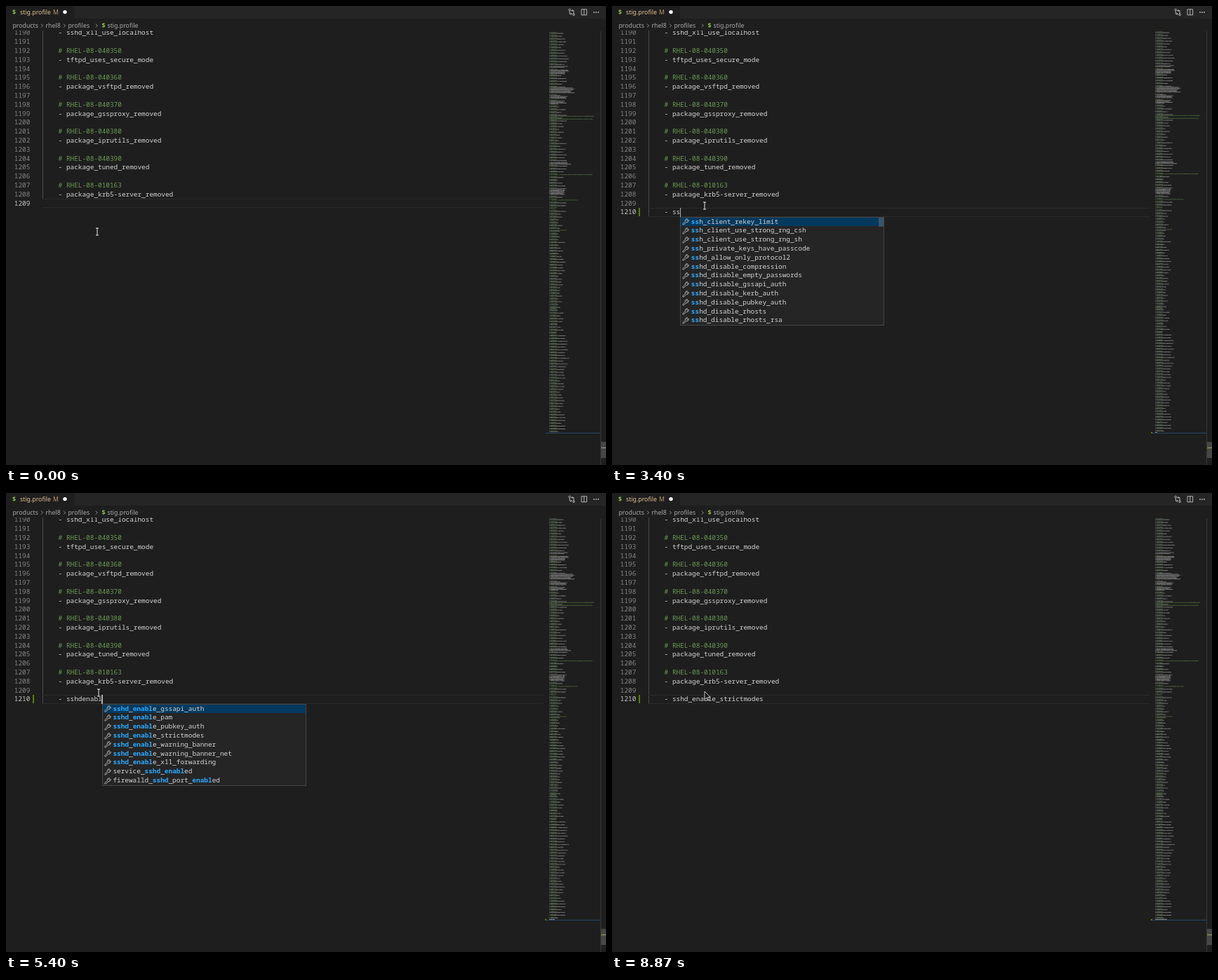
Write an HTML page with a canvas that moves like this. It is 855 px wide and 655 px high and loops after 8940 ms.

```html
<!DOCTYPE html>
<html lang="en">
<head>
<meta charset="utf-8">
<title>Profile editor</title>
<style>
html, body { margin: 0; width: 100%; height: 100%; overflow: hidden; background: #1e1e1e; }
#stage { position: absolute; left: 0; top: 0; width: 855px; height: 655px; overflow: hidden; background: #1e1e1e;
  font: 8.74px/12px "Noto Sans", sans-serif; color: #a9a9a9; }
#stage div, #stage svg, canvas, .ui { position: absolute; white-space: pre; }
#tabs { left: 0; top: 0; width: 855px; height: 18px; background: #252526; }
#tab { left: 0; top: 0; width: 97px; height: 18px; background: #1e1e1e; }
.shell { color: #8dc149; font-weight: bold; }
#code { left: 0; top: 35px; width: 766px; height: 620px; overflow: hidden; }
.mono, .row, .num { font: 9.41px/12.8px "Noto Sans Mono", monospace; color: #d4d4d4; }
.num { left: 0; width: 34.4px; text-align: right; color: #858585; }
.num.on { color: #c6c6c6; }
#stage .note { color: #6a9955; }
#guide { left: 52px; top: 0; width: 1px; background: #4a4a4a; }
#current { left: 52px; width: 714px; height: 12.8px; box-sizing: border-box; border: solid #2b2b2b; border-width: 1px 0; }
#caret { width: 1.4px; height: 12.8px; background: #aeafad; }
#added { left: 38px; top: 288px; width: 2px; height: 12px; background: #587c0c; }
#list { top: 300.5px; width: 289px; background: #252526; border: 1px solid #454545; }
.row { left: 0; width: 289px; height: 12.8px; }
.row.on { background: #04395e; }
.row span { position: absolute; left: 14.8px; }
.row b { color: #2aaaff; }
.row svg { left: 2px; top: 1.8px; }
#thumb { right: 0; top: 0; width: 7px; background: rgba(121, 121, 121, .45); }
</style>
</head>
<body>
<div id="stage">
  <div id="tabs"></div>
  <div id="tab"></div>
  <span class="ui shell" style="left:9px;top:2.5px">$</span>
  <span class="ui" style="left:20px;top:2.5px;color:#e2c08d">stig.profile</span>
  <span class="ui" style="left:67px;top:2.5px;color:#b39b75">M</span>
  <span class="ui" style="left:9.5px;top:22px">products</span>
  <span class="ui" style="left:56.5px;top:22px">rhel8</span>
  <span class="ui" style="left:88.5px;top:22px">profiles</span>
  <span class="ui shell" style="left:136.5px;top:22px">$</span>
  <span class="ui" style="left:144.5px;top:22px">stig.profile</span>
  <svg width="855" height="36" style="left:0;top:0" fill="none" stroke="#a9a9a9" stroke-width=".8">
    <circle cx="84" cy="8.6" r="2.7" fill="#fff" stroke="none"/>
    <path d="M50 25.5l2.5 2.5l-2.5 2.5M82 25.5l2.5 2.5l-2.5 2.5M127.8 25.5l2.5 2.5l-2.5 2.5"/>
    <g stroke="#c5c5c5" stroke-width=".9">
      <circle cx="803.2" cy="5.5" r="1.3"/><circle cx="809" cy="12.2" r="1.3"/>
      <path d="M803.2 6.8V11.2H806M804.8 9.7L806.3 11.2L804.8 12.7M809 10.9V6.5H806.2M807.4 5L805.9 6.5L807.4 8"/>
      <path d="M820 4.8h7.6v8h-7.6zM823.8 4.8v8"/>
    </g>
    <g fill="#c5c5c5" stroke="none"><circle cx="838" cy="8.9" r=".9"/><circle cx="841" cy="8.9" r=".9"/><circle cx="844" cy="8.9" r=".9"/></g>
  </svg>
  <div id="code"><div id="guide"></div></div>
  <div id="current"></div>
  <div id="added"></div>
  <div id="entry" class="mono" style="left:74.6px"></div>
  <div id="caret"></div>
  <div id="mini" style="left:768px;top:36px;width:79px;height:575px;overflow:hidden">
    <canvas id="map" width="79" height="575" style="left:0;top:0"></canvas>
    <div style="left:0;top:573px;width:79px;height:1px;background:#23486a"></div>
    <div id="miniMark" style="left:0;top:572px;width:2px;height:2px;background:#587c0c"></div>
    <div id="miniText" style="left:6.2px;top:572px;height:1px;background:#858585"></div>
  </div>
  <div style="left:847px;top:36px;width:1px;height:619px;background:#383838"></div>
  <div style="left:848px;top:622px;width:7px;height:23px;background:#464646"></div>
  <div style="left:848px;top:630px;width:7px;height:1px;background:#a0a0a0"></div>
  <div id="rulerMark" style="left:848px;top:629px;width:2px;height:3px;background:#587c0c"></div>
  <div id="list"></div>
  <svg id="mouse" width="20" height="24" style="overflow:visible">
    <g id="beam" fill="none">
      <path d="M-2 -5H2M-2 5H2M0 -5V5" stroke="#111" stroke-width="2.2"/>
      <path d="M-2 -5H2M-2 5H2M0 -5V5" stroke="#f4f4f4"/>
    </g>
    <path id="arrow" d="M0 -2V9.5L2.8 7L4.6 11L6.2 10.3L4.5 6.4H8Z" fill="#111" stroke="#eee" stroke-width=".8"/>
  </svg>
</div>
<script>
const $ = id => document.getElementById(id);
const LOOP = 8940, CHAR = 5.65, LINE = 12.8, LEFT = 51.45;
const lineTop = n => 57.9 + (n - 1192) * LINE;

function add(parent, cls, text, style) {
  const el = document.createElement('div');
  el.className = cls;
  el.textContent = text;
  Object.assign(el.style, style);
  parent.append(el);
  return el;
}

// Editor text
const source = `- sshd_x11_use_localhost

# RHEL-08-040350
- tftpd_uses_secure_mode

# RHEL-08-040360
- package_vsftpd_removed

# RHEL-08-040370
- package_gssproxy_removed

# RHEL-08-040380
- package_iprutils_removed

# RHEL-08-040390
- package_tuned_removed

# RHEL-08-010163
- package_krb5-server_removed`.split('\n');
const nums = {};
for (let n = 1190; n <= 1210; n++) {
  const top = lineTop(n) - 35 + 'px', text = source[n - 1190] || '';
  nums[n] = add($('code'), 'num', n, { top });
  add($('code'), text[0] === '#' ? 'mono note' : 'mono', text, { left: '74.6px', top });
}
$('entry').style.top = lineTop(1210) + 'px';

// Minimap: groups of comment, rule, blank, with a few dense blocks and long comments
function drawMap() {
  const g = $('map').getContext('2d'), step = 1.344, unit = 0.672;
  let seed = 11;
  const rnd = () => (seed = seed * 16807 % 2147483647) / 2147483647;
  const dense = [[84, 87, 42], [90, 96, 42], [115, 123, 58], [128, 132, 39], [134, 138, 38], [222, 226, 46], [259, 269, 36]];
  const long = { 157: 95, 160: 92, 240: 92, 276: 60, 288: 14, 319: 36, 430: 14 };
  const bands = [[80, 24, 44], [115, 20, 40], [235, 18, 38], [275, 16, 34], [345, 18, 36], [430, 18, 34], [466, 14, 30], [500, 32, 48], [532, 26, 42], [620, 18, 34]];
  const row = (y, len, color) => {
    g.fillStyle = color;
    for (let c = 0; c < len; c++) {
      if (c === 1) continue;
      g.globalAlpha = 0.35 + 0.4 * rnd();
      g.fillRect(3.5 + (c + 4) * unit, y - 35.6, unit, 1);
    }
  };
  for (let i = 1, y; (y = 608 - i * step) > 34; i++) {
    const wide = Object.keys(long).find(k => Math.abs(k - y) < step / 2);
    const block = dense.find(([a, b]) => y >= a && y <= b);
    const [, lo, hi] = bands.find(b => y < b[0]);
    const size = lo + (hi - lo) * rnd();
    if (wide) row(y, long[wide], '#6a9955');
    else if (block) row(y, block[2] * (0.75 + 0.25 * rnd()), '#c4c4c4');
    else if (i % 3 === 1) row(y, size, '#c4c4c4');
    else if (i % 3 === 2) row(y, 16, '#6a9955');
  }
}
drawMap();

// Completion lists
const names = (prefix, words) => words.split(' ').map(w => prefix + w);
const disable = names('sshd_disable_', 'compression empty_passwords gssapi_auth kerb_auth pubkey_auth rhosts rhosts_rsa');
const enable = names('sshd_enable_', 'gssapi_auth pam pubkey_auth strictmodes warning_banner warning_banner_net x11_forwarding');
const protocol = 'sshd_allow_only_protocol2';
const lists = {
  ssh: [...names('ssh_', 'client_rekey_limit client_use_strong_rng_csh client_use_strong_rng_sh private_keys_have_passcode'), protocol, ...disable],
  sshd: [protocol, ...disable, ...names('sshd_disable_', 'root_login root_password_login tcp_forwarding user_known_hosts')],
  sshde: [...enable, ...names('sshd_', 'rekey_limit set_idle_timeout set_login_grace_time set_loglevel_info set_loglevel_verbose')],
  sshdena: [...enable, 'service_sshd_enabled', 'firewalld_sshd_port_enabled'],
  sshdenables: [enable[3], enable[0]],
  sshdenablestr: [enable[3]]
};
const thumbs = { ssh: 13, sshd: 17, sshde: 20 };

function match(name, query) {
  let q = 0;
  const start = name.indexOf(query.slice(0, 4));
  return [...name].map((ch, i) => i >= start && ch === query[q] ? (q++, `<b>${ch}</b>`) : ch).join('');
}

const wrench = `<svg width="10" height="10" viewBox="0 0 10 10" fill="none" stroke="#c5c5c5" stroke-width=".9">
<path d="M1 7.7L4.4 4.3Q3.9 2.5 5.2 1.4Q6.3 .5 7.8 1L6.2 2.6L7.4 3.8L9 2.2Q9.5 3.8 8.5 4.8Q7.3 6 5.7 5.6L2.3 9Q1.5 9.4 .9 8.8Q.5 8.2 1 7.7Z"/></svg>`;

function showList(query, x) {
  const key = Object.keys(lists).filter(k => query.startsWith(k)).pop() || 'ssh';
  const box = $('list'), items = lists[key];
  box.innerHTML = items.map((name, i) =>
    `<div class="row${i ? '' : ' on'}" style="top:${i * LINE}px">${wrench}<span>${match(name, query)}</span></div>`).join('') +
    (thumbs[key] ? `<div id="thumb" style="height:${thumbs[key]}px"></div>` : '');
  box.style.left = x + 'px';
  box.style.height = items.length * LINE + 'px';
}

// [time, text of the new line, caret visible]
const keys = [
  [0, null, 0], [330, null, 1], [800, null, 0], [1270, null, 1],
  [1800, '', 1], [2930, '- ', 1], [3130, '- s', 1], [3400, '- ss', 1], [3670, '- ssh', 1], [4070, '- ssh', 0],
  [4270, '- sshd', 1], [4670, '- sshd', 0], [4930, '- sshde', 1], [5200, '- sshdena', 1], [5400, '- sshdenabl', 1],
  [5600, '- sshdenable', 1], [6070, '- sshdenable', 0], [6330, '- sshdenablest', 1], [6600, '- sshdenablestri', 1],
  [6870, '- sshdenablestric', 1], [7200, '- sshdenablestrict', 1],
  [7400, '- sshd_enable_strictmodes', 1], [7870, '- sshd_enable_strictmodes', 0],
  [8400, '- sshd_enable_strictmodes', 1], [8870, '- sshd_enable_strictmodes', 0]
];
// [time, x, y]
const moves = [[0, 129.5, 322], [330, 129.8, 314], [400, 130.4, 302], [530, 131, 291], [670, 131.4, 286], [800, 131.5, 285]];
const at = (table, t) => table.filter(k => k[0] <= t).pop();
const show = (id, on) => { $(id).style.visibility = on ? 'visible' : 'hidden'; };

function paintText([time, text, caret]) {
  const opened = text !== null, typed = text || '';
  const top = lineTop(opened ? 1210 : 1209);
  const x = LEFT + (opened ? 4 + typed.length : 0) * CHAR;
  const listed = typed.length > 2 && time < 7400;
  $('entry').textContent = typed;
  $('current').style.top = $('caret').style.top = top - 0.4 + 'px';
  $('caret').style.left = x + 'px';
  $('guide').style.height = (opened ? 265 : 240) + 'px';
  $('map').style.top = (opened ? -1.34 : 0) + 'px';
  $('miniText').style.width = typed.length * 0.672 + 'px';
  nums[1209].className = opened ? 'num' : 'num on';
  nums[1210].className = 'num on';
  nums[1210].style.visibility = opened ? 'visible' : 'hidden';
  show('caret', caret);
  for (const id of ['added', 'miniMark', 'rulerMark']) show(id, typed);
  show('list', listed);
  if (listed) showList(typed.slice(2), x + 0.4);
}

const begin = performance.now();
let last;
function frame() {
  const t = (performance.now() - begin) % LOOP, key = at(keys, t), [, x, y] = at(moves, t);
  if (key !== last) paintText(last = key);
  $('mouse').style.left = x + 'px';
  $('mouse').style.top = y + 'px';
  show('beam', t < 8870);
  show('arrow', t >= 8870);
  requestAnimationFrame(frame);
}
frame();
</script>
</body>
</html>
```
